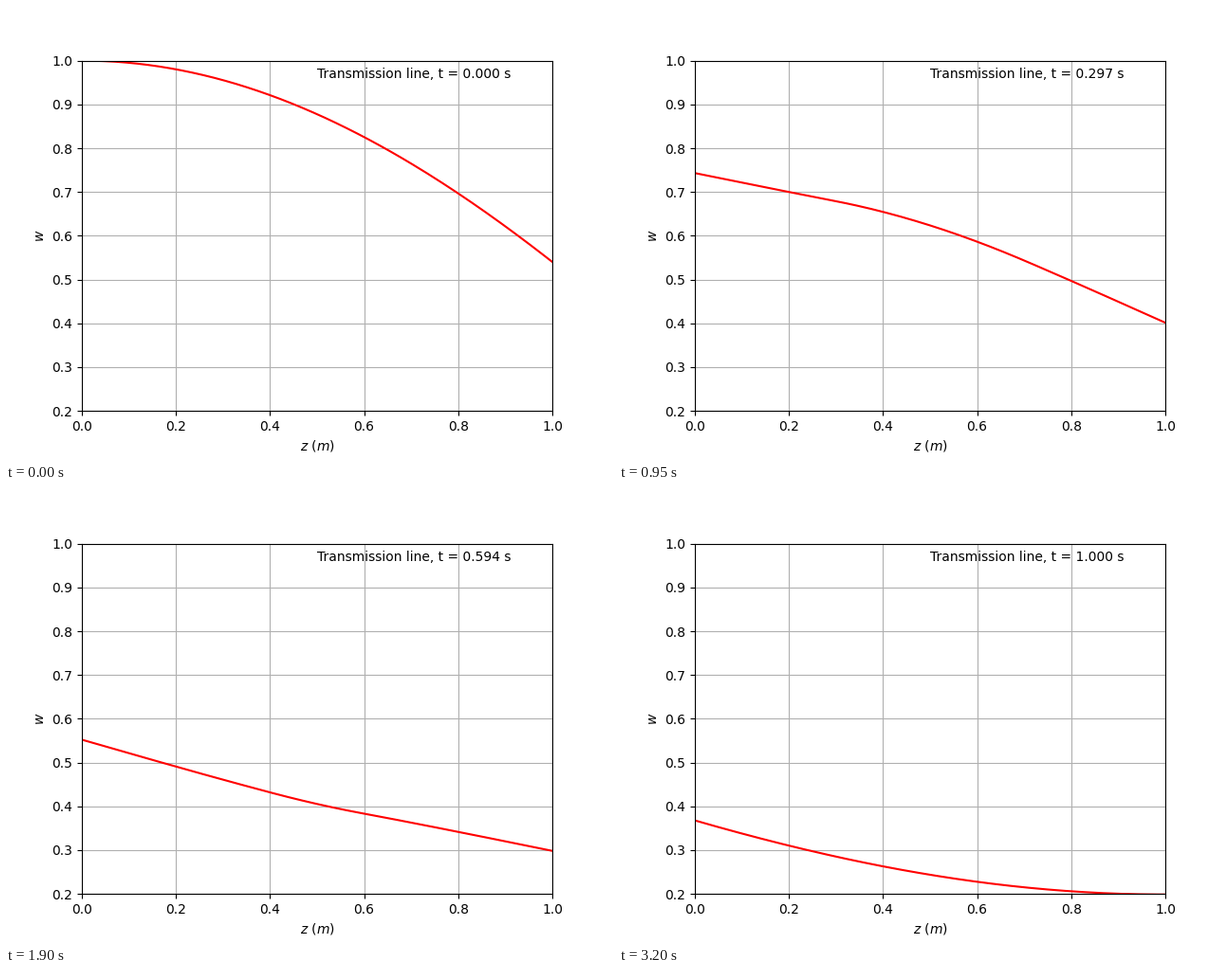
Recreate the animation shown at these times as a matplotlib script. Size 640 by 480 pixels, loop 3250 ms.

```python
import numpy as np
import matplotlib.pyplot as plt
from matplotlib.animation import FuncAnimation

STEPS = 64          # time steps from t = 0 to t = 1
INTERVAL = 50       # ms per frame

z = np.linspace(0, 1, 129)


def base(x):
    """Straight line joining the two boundary values."""
    return 1 + (np.cos(1) - 1) * x


def odd_wave(x):
    """Initial deviation from the base line, extended oddly with period 2."""
    x = (x + 1) % 2 - 1
    r = np.abs(x)
    return np.sign(x) * (np.cos(r) - base(r))


def solution(t):
    """Damped line w_tt + 2 w_t + w = w_zz by d'Alembert's formula."""
    return np.exp(-t) * (base(z) + (odd_wave(z - t) + odd_wave(z + t)) / 2)


fig, ax = plt.subplots(figsize=(6.4, 4.8), dpi=100)
ax.set(xlim=(0, 1), ylim=(0.2, 1), xlabel="$z$ ($m$)", ylabel="$w$")
ax.grid(True)
line, = ax.plot(z, solution(0), "r")
label = ax.text(0.5, 0.95, "", transform=ax.transAxes)


def update(i):
    t = i / STEPS
    line.set_ydata(solution(t))
    label.set_text(f"Transmission line, t = {t:.3f} s")
    return line, label


anim = FuncAnimation(fig, update, frames=STEPS + 1, interval=INTERVAL,
                     repeat=True, repeat_delay=0, blit=False)
plt.show()
```
